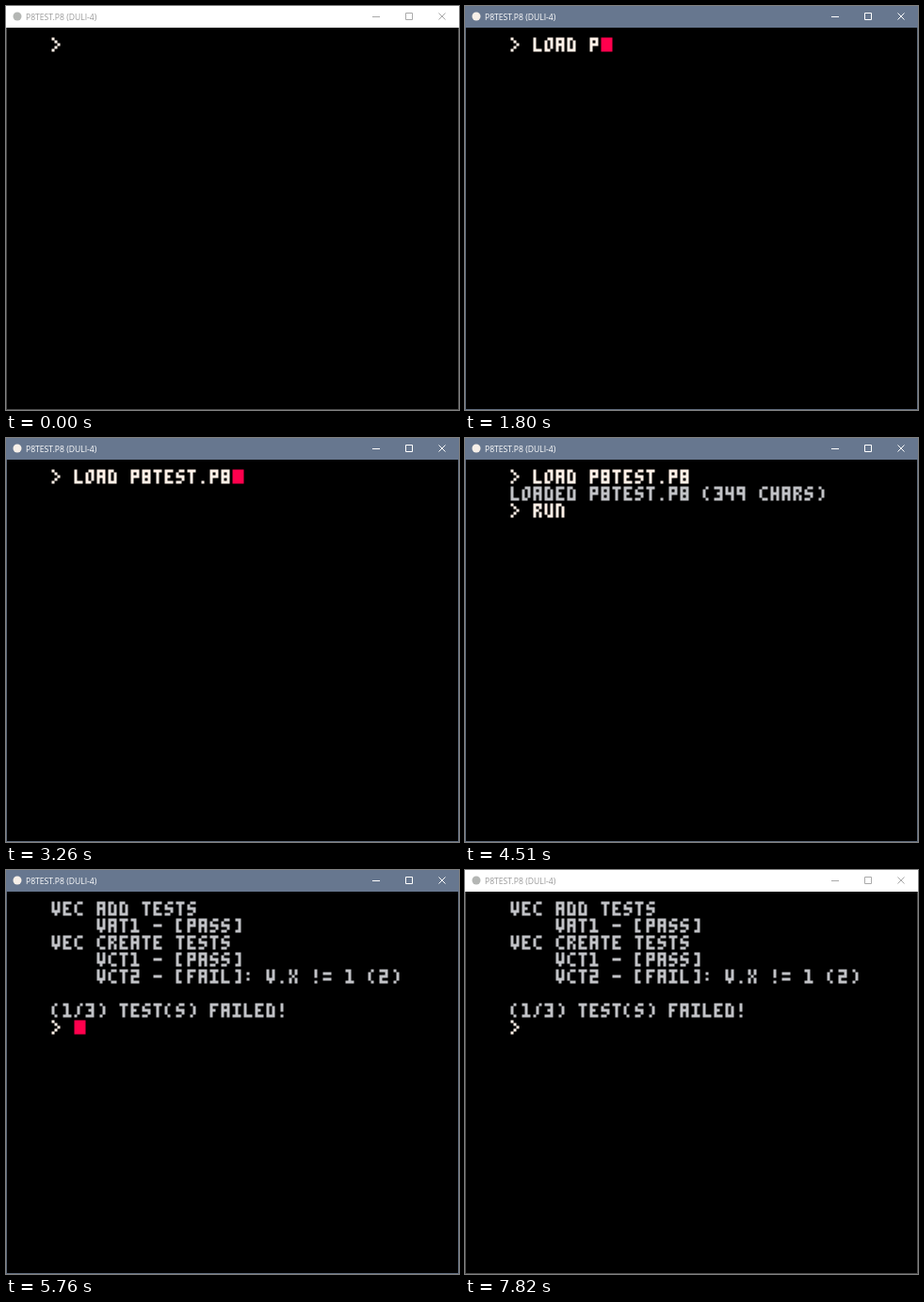
Animation of 481 by 429 pixels, one loop 7890 ms. Source, as an HTML page with a canvas:

```html
<!DOCTYPE html>
<html lang="en">
<head>
<meta charset="utf-8">
<title>Console test run</title>
<style>
  html, body { margin: 0; width: 100%; height: 100%; overflow: hidden; background: #000; }
  canvas { display: block; }
</style>
</head>
<body>
<canvas id="stage" width="481" height="429"></canvas>
<script>
const ctx = document.getElementById('stage').getContext('2d');
const LOOP = 7890;
const WHITE = '#fff1e8', GREY = '#c2c3c7', RED = '#ff004d';

// Strokes of a 3 by 5 pixel font; "h.01" makes a single dot.
const strokes = {
  A: 'M0 4V0H2V4M0 2H2',
  C: 'M2 0H1M0 1V3M1 4H2',
  D: 'M1 0H0V4H2V1',
  E: 'M2 0H0V4H2M0 2H1',
  F: 'M2 0H0V4M0 2H1',
  H: 'M0 0V4M2 0V4M0 2H2',
  I: 'M0 0H2M1 0V4M0 4H2',
  L: 'M0 0V4H2',
  N: 'M1 0H0V4M2 1V4',
  O: 'M1 0H2V3M0 1V4H1',
  P: 'M0 4V0H2V2H0',
  R: 'M0 4V0H2V1M0 2H1M2 3V4',
  S: 'M2 0H1M0 1V2H2V3M1 4H0',
  T: 'M0 0H2M1 0V4',
  U: 'M0 0V3M2 0V4H1',
  V: 'M0 0V3H2V0M1 3V4',
  X: 'M0 0V1M2 0V1M1 2h.01M0 3V4M2 3V4',
  1: 'M0 0H1V4M0 4H2',
  2: 'M0 0H2V2H0V4H2',
  3: 'M0 0H2V4H0M1 2H2',
  4: 'M0 0V2H2M2 0V4',
  8: 'M0 0H2V4H0V0M0 2H2',
  9: 'M2 4V0H0V2H2',
  '.': 'M1 4h.01',
  '-': 'M0 2H2',
  '>': 'M0 0h.01M1 1h.01M2 2h.01M1 3h.01M0 4h.01',
  '(': 'M1 0h.01M0 1V3M1 4h.01',
  ')': 'M1 0h.01M2 1V3M1 4h.01',
  '[': 'M1 0H0V4H1',
  ']': 'M1 0H2V4H1',
  ':': 'M1 1h.01M1 3h.01',
  '!': 'M1 0V2M1 4h.01',
  '=': 'M0 1H2M0 3H2',
  '/': 'M2 0h.01M1 1V3M0 4h.01'
};
const glyphs = Object.fromEntries(
  Object.entries(strokes).map(([char, d]) => [char, new Path2D(d)]));

const loadKeys = [1400, 1540, 1640, 1720, 1720, 1800, 2050, 2130, 2230, 2310, 2390, 2830, 2920, 3100];
const runKeys = [4060, 4140, 4230];
const cursorToggles = [
  690, 950, 1210, 1470, 1720, 1970, 2230, 2480, 2710, 3000, 3260, 3490, 3740,
  3970, 4230, 4510, 5310, 5500, 5760, 6040, 6290, 6530, 6810, 7040, 7300, 7550];
const LOADED_AT = 3420, CLEARED_AT = 4940, PROMPT_AT = 5310;

const report = [
  [5020, 'VEC ADD TESTS'],
  [5020, '    VAT1 - [PASS]'],
  [5110, 'VEC CREATE TESTS'],
  [5110, '    VCT1 - [PASS]'],
  [5210, '    VCT2 - [FAIL]: V.X != 1 (2)'],
  [5210, ''],
  [5210, '(1/3) TEST(S) FAILED!']
];

const countUntil = (times, t) => times.filter(time => time <= t).length;
const typed = (text, keys, t) => '> ' + text.slice(0, countUntil(keys, t));

function consoleLines(t) {
  if (t >= CLEARED_AT) {
    const lines = report.filter(([time]) => time <= t).map(([, text]) => [text, GREY]);
    if (t >= PROMPT_AT) lines.push(['> ', WHITE]);
    return lines;
  }
  const lines = [[typed('LOAD P8TEST.P8', loadKeys, t), WHITE]];
  if (t >= LOADED_AT) {
    lines.push(['LOADED P8TEST.P8 (349 CHARS)', GREY], [typed('RUN', runKeys, t), WHITE]);
  }
  return lines;
}

// One unit is one console pixel, measured from the top left of a character cell.
function atCell(column, row) {
  ctx.setTransform(3, 0, 0, 3, 48.5 + column * 12, 33.5 + row * 18);
}

function drawConsole(t) {
  const lines = consoleLines(t);
  ctx.lineWidth = 1;
  ctx.lineCap = 'square';
  lines.forEach(([text, color], row) => {
    ctx.strokeStyle = color;
    [...text].forEach((char, column) => {
      if (!glyphs[char]) return;
      atCell(column, row);
      ctx.translate(.5, .5);
      ctx.stroke(glyphs[char]);
    });
  });
  if (countUntil(cursorToggles, t) % 2) {
    atCell(lines.at(-1)[0].length, lines.length - 1);
    ctx.fillStyle = RED;
    ctx.fillRect(0, 0, 4, 5);
  }
  ctx.resetTransform();
}

function drawWindow(active) {
  ctx.fillStyle = '#000';
  ctx.fillRect(0, 0, 481, 429);
  ctx.lineWidth = 1;
  ctx.lineCap = 'butt';
  ctx.strokeStyle = active ? '#5f6b7c' : '#4a4a4a';
  ctx.strokeRect(.5, .5, 480, 428);
  ctx.fillStyle = active ? '#67778f' : '#fff';
  ctx.fillRect(0, 0, 481, 23);

  ctx.fillStyle = active ? '#f6efe8' : '#b4b6b4';
  ctx.beginPath();
  ctx.arc(12, 11, 4.5, 0, 7);
  ctx.fill();

  ctx.fillStyle = active ? '#fff' : '#999';
  ctx.font = '8.6px "Open Sans", sans-serif';
  ctx.fillText('P8TEST.P8 (DULI-4)', 21, 15);

  ctx.strokeStyle = active ? '#fff' : '#aaa';
  ctx.stroke(new Path2D('M389 11.5h8M424.5 7.5h7v7h-7zM459.5 7.5l7 7M466.5 7.5l-7 7'));
}

function frame() {
  const t = performance.now() % LOOP;
  drawWindow(t >= 570 && t < 7820);
  drawConsole(t);
  requestAnimationFrame(frame);
}
frame();
</script>
</body>
</html>
```
